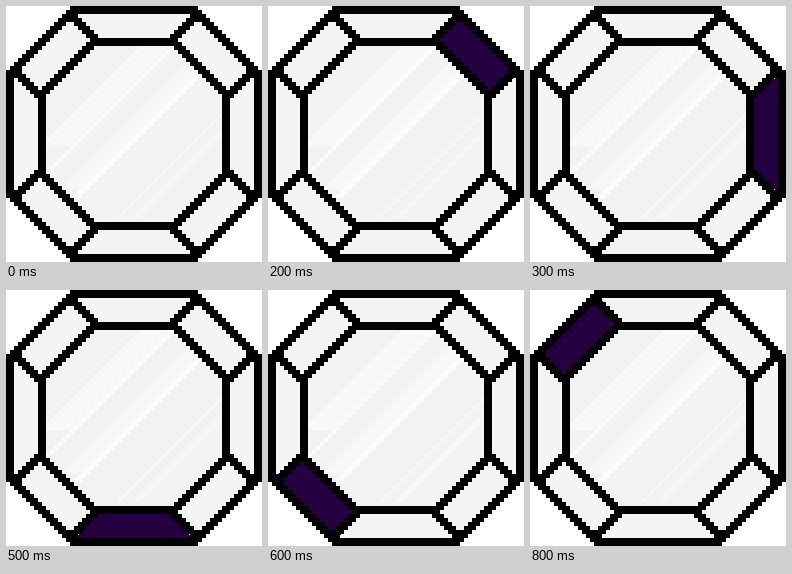
These frames come from a looping animation (256 px wide and 256 px high, 0.9 s). An HTML page:

```html
<!DOCTYPE html>
<html lang="en">
<head>
<meta charset="utf-8">
<title>Octagon gem</title>
<style>
html, body { margin: 0; width: 100%; height: 100%; overflow: hidden; background: #fff; }
svg { display: block; width: 100vw; height: 100vh; }
</style>
</head>
<body>
<svg id="gem" viewBox="0 0 64 64" shape-rendering="crispEdges"></svg>
<script>
const svg = document.getElementById('gem');
const STEP = 100, LOOP = 900;
const PALE = '#f4f4f4', LIT = '#240041';

function add(tag, attrs) {
  const el = document.createElementNS('http://www.w3.org/2000/svg', tag);
  for (const key in attrs) el.setAttribute(key, attrs[key]);
  return svg.appendChild(el);
}

// Corners clockwise from the left end of the top side.
const octagon = (near, a) => {
  const far = 64 - near, b = 64 - a;
  return [[a, near], [b, near], [far, a], [far, b], [b, far], [a, far], [near, b], [near, a]];
};
const outer = octagon(1, 17), inner = octagon(9, 22);
const spokeStart = octagon(2, 16), spokeEnd = octagon(8, 22);

// Pixel line drawn with a square brush of two cells.
function pixelLine([x0, y0], [x1, y1]) {
  const n = Math.max(Math.abs(x1 - x0), Math.abs(y1 - y0));
  let d = '';
  for (let i = 0; i <= n; i++) {
    const x = Math.round(x0 + (x1 - x0) * i / n);
    const y = Math.round(y0 + (y1 - y0) * i / n);
    d += `M${x - 1} ${y - 1}h2v2h-2z`;
  }
  return d;
}

// Diagonal band of cells starting at x + y = sum, between two columns.
function streak(sum, from, to, width, fill) {
  let d = '';
  for (let x = from; x <= to; x++) d += `M${x} ${sum - x}h${width}v1h${-width}z`;
  add('path', { d, fill });
}

add('polygon', { points: inner.join(' '), fill: '#f2f2f2' });
streak(43, 9, 34, 9, '#f8f8f8');
streak(51, 10, 42, 1, '#fdfdfd');
streak(59, 14, 50, 5, '#f7f7f7');
streak(64, 17, 47, 2, '#fcfcfc');
streak(80, 28, 53, 1, '#f7f7f7');
streak(84, 32, 53, 2, '#f6f6f6');

const facets = outer.map((p, i) => {
  const j = (i + 1) % 8;
  return add('polygon', { points: [p, outer[j], inner[j], inner[i]].join(' '), fill: PALE });
});

let lines = '';
for (let i = 0; i < 8; i++) {
  const j = (i + 1) % 8;
  lines += pixelLine(outer[i], outer[j]) + pixelLine(inner[i], inner[j]) + pixelLine(spokeStart[i], spokeEnd[i]);
}
add('path', { d: lines, fill: '#000' });

function draw(time) {
  const active = Math.floor(time % LOOP / STEP) - 1;
  facets.forEach((f, i) => f.setAttribute('fill', i === active ? LIT : PALE));
}

const start = performance.now();
function tick() {
  draw(performance.now() - start);
  requestAnimationFrame(tick);
}
tick();
</script>
</body>
</html>
```
